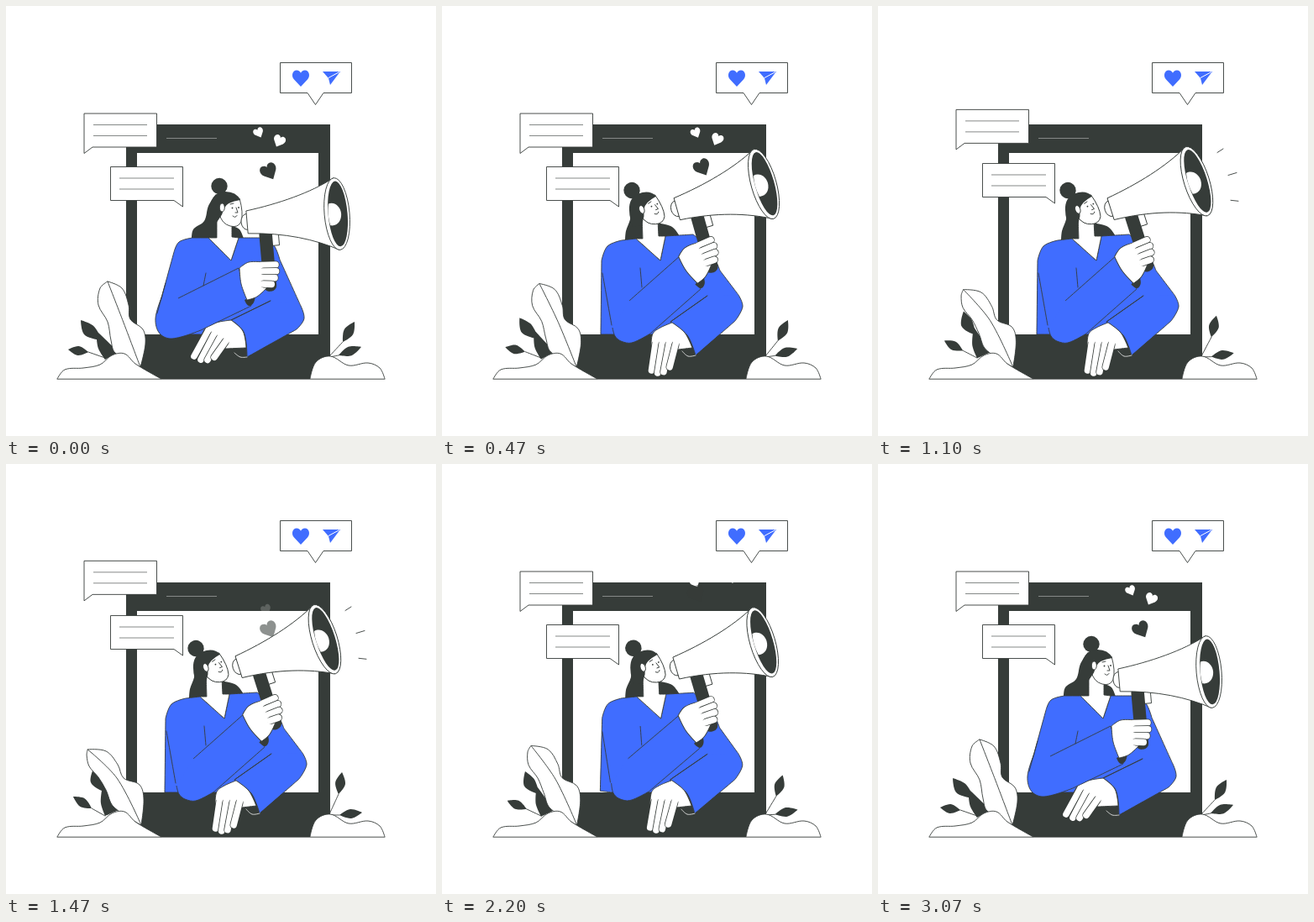
Recreate the animation shown at these times as an HTML page. Size 512 by 512 pixels, loop 3100 ms.

```html
<!DOCTYPE html>
<html lang="en">
<head>
<meta charset="utf-8">
<title>Megaphone announcement</title>
<style>
  html, body { margin: 0; width: 100%; height: 100%; overflow: hidden; background: #fff; }
  svg { display: block; width: 100vw; height: 100vh; }
  .ink { fill: #363c39; }
  .white, .blue { stroke: #363c39; stroke-width: .9; stroke-linejoin: round; }
  .white { fill: #fff; }
  .blue { fill: #406dff; }
  .plain { fill: #fff; }
  .icon { fill: #406dff; }
  .line, .rule, .light, .edge, .finger { fill: none; stroke: #363c39; stroke-width: .9; stroke-linecap: round; }
  .rule { stroke: #858987; stroke-width: 1; stroke-linecap: butt; }
  .light { stroke: #e4e5e4; }
  .edge { stroke-width: 9.2; }
  .finger { stroke: #fff; stroke-width: 7.6; }
</style>
</head>
<body>
<svg viewBox="0 0 512 512">
  <defs>
    <path id="heart" d="M0 10L-8 1.5C-12-3-9.5-9.6-5-9.6C-2.5-9.6-.8-8.2 0-6.2C.8-8.2 2.5-9.6 5-9.6C9.5-9.6 12-3 8 1.5Z"/>
  </defs>

  <g id="plants"></g>
  <path class="ink" fill-rule="evenodd" d="M143 141H386V444H143ZM156 175V391H372V175Z"/>
  <path class="rule" d="M191 157.5H251"/>
  <g id="hearts"></g>

  <g id="bubbleA">
    <path class="white" d="M93 128H179.5V168H103L93 175.5Z"/>
    <path class="rule" d="M104 141.5H168M104 154.5H168"/>
  </g>
  <g id="bubbleB">
    <path class="white" d="M124.5 191.5H210.5V239L200 231.5H124.5Z"/>
    <path class="rule" d="M135 205H200M135 218H200"/>
  </g>
  <path class="white" d="M326.5 67.5H411.5V103.5H378L368.5 117.5L359 103.5H326.5Z"/>
  <use id="like" class="icon" href="#heart"/>
  <g id="send">
    <path class="icon" d="M-11-8H10L-2 8L-4 0Z"/>
    <path d="M-4-.5L9-7.5" fill="none" stroke="#fff"/>
  </g>

  <g id="ground"></g>
  <path class="line" d="M61 444.2H451"/>

  <g id="torso"></g>
  <g id="head">
    <circle class="ink" r="9.7"/>
    <path class="white" d="M24 14.5Q29 32 26 42.5Q22 50 13 47.5Q3 45 0 33L4 22Z"/>
    <path class="ink" d="M-14 41.5Q-13 7 6 6.5Q20 6 25 16.5Q9 19 6 26L3 34L-3 43Z"/>
    <ellipse class="white" cx="3.3" cy="25.5" rx="3" ry="5"/>
    <circle class="ink" cx="15.5" cy="26" r=".9"/>
    <circle class="ink" cx="23" cy="25.5" r=".9"/>
    <path class="line" d="M20 25.5L22 31.5H19M16 35.5Q19 38.5 21 35M13 21.5L17 20.5"/>
  </g>
  <g id="horn">
    <rect class="white" x="28" y="12" width="9" height="19"/>
    <rect class="ink" x="14" y="10" width="15.5" height="75" rx="7"/>
    <ellipse class="white" cx="1" rx="7" ry="9.5"/>
    <path class="white" d="M1-13C40-18 80-28 108-43V43C80 28 45 17 1 14Z"/>
    <ellipse class="white" cx="108.5" rx="15" ry="43"/>
    <ellipse class="ink" cx="109.5" rx="11.5" ry="39"/>
    <path class="plain" d="M99.5-13C108-15 113.5-7 113.5 0C113.5 8 108 15 99.5 13Q96.7 0 99.5-13Z"/>
  </g>
  <g id="arms"></g>
  <g id="fist"></g>
  <path id="sound" class="line" d="M404 174.5L411 170M417 201.5L427 198.5M420 231.3L429 232.3"/>
</svg>

<script>
const LOOP = 3100;
const $ = id => document.getElementById(id);
const mix = (a, b, p) => a + (b - a) * p;
const moving = [];

function add(parent, tag, cls) {
  const el = document.createElementNS('http://www.w3.org/2000/svg', tag);
  el.setAttribute('class', cls);
  $(parent).append(el);
  return el;
}

// "x,y" is a smooth point, "x,y!" a corner, a final "z" closes the curve.
function parse(text) {
  return text.replace(' z', '').split(' ').map(s => {
    const [x, y] = s.replace('!', '').split(',').map(Number);
    return { x, y, corner: s.endsWith('!') };
  });
}

function curve(pts, closed) {
  const n = pts.length, at = i => pts[(i + n) % n];
  const handle = (i, length) => {
    const p = at(i), a = at(i - 1), b = at(i + 1);
    const k = p.corner ? 0 : length / 3 / Math.hypot(b.x - a.x, b.y - a.y);
    return [(b.x - a.x) * k, (b.y - a.y) * k];
  };
  let d = `M${pts[0].x} ${pts[0].y}`;
  for (let i = 0; i < n - !closed; i++) {
    const p = at(i), q = at(i + 1), length = Math.hypot(q.x - p.x, q.y - p.y);
    const [ax, ay] = handle(i, length), [bx, by] = handle(i + 1, length);
    d += `C${p.x + ax} ${p.y + ay} ${q.x - bx} ${q.y - by} ${q.x} ${q.y}`;
  }
  return closed ? d + 'Z' : d;
}

// A curve that blends between two poses along one channel.
function shape(parent, cls, from, to = from, channel) {
  const el = add(parent, 'path', cls), a = parse(from), b = parse(to), closed = from.endsWith('z');
  const update = pose => {
    const p = channel ? pose[channel] : 0;
    const pts = a.map((s, i) => ({ x: mix(s.x, b[i].x, p), y: mix(s.y, b[i].y, p), corner: s.corner }));
    el.setAttribute('d', curve(pts, closed));
  };
  if (channel) moving.push(update); else update();
}

const segment = (a, b) => `${a}! ${b}!`;

// The white core starts earlier than its edge, so the finger opens into the palm.
function finger(parent, a, b, a2 = a, b2 = b, channel) {
  const back = (p, q) => p.map((v, k) => mix(v, q[k], -.15));
  shape(parent, 'edge', segment(a, b), segment(a2, b2), channel);
  shape(parent, 'finger', segment(back(a, b), b), segment(back(a2, b2), b2), channel);
}

function blade([bx, by], [tx, ty], width) {
  const k = width / Math.hypot(tx - bx, ty - by), nx = (by - ty) * k, ny = (tx - bx) * k;
  const mx = (bx + tx) / 2, my = (by + ty) / 2;
  return `${bx},${by}! ${mx + nx},${my + ny} ${tx},${ty}! ${mx - nx},${my - ny} z`;
}

function sprig(root, base, tip, base2, tip2, width) {
  shape('plants', 'ink', blade(base, tip, width), blade(base2, tip2, width), 'sway');
  shape('plants', 'line', segment(base, root), segment(base2, root), 'sway');
}

// Plants and ground
sprig([118, 419], [98, 412], [74, 409], [102, 410], [80, 396], 5.5);
sprig([385, 417], [401, 400], [415, 376], [396, 393], [400, 367], 6);
sprig([385, 418], [396, 416], [423, 406], [397, 418], [424, 415], 5.5);
shape('plants', 'ink',
  '89,374! 103,380 110,389! 134,412! 118,421! 110,408 108,397! 93,391 z',
  '105,361! 113,371 116,382! 134,412! 118,419! 113,404 114,389! 101,379 z', 'sway');
shape('ground', 'white',
  '121,328! 138,336 146,356 148,373 163,385 166,402 160,430! 130,413 125,398 121,376 110,356 112,336 z',
  '97,340! 119,342 133,358 140,374 159,382 164,399 161,430! 128,408 119,388 110,373 99,360 96,347 z', 'sway');
shape('ground', 'line', '121,328! 140,377 160,430!', '97,340! 132,374 161,430!', 'sway');
shape('ground', 'white', '61,444! 70,433 92,431 112,427 126,416 141,414 154,426 185,444!');
shape('ground', 'white', '362,444! 369,424 386,417 408,428 431,425 445,431 451,444!');

// Hair, torso and neck
shape('torso', 'ink',
  '250,224! 241,238 236,256 223,266 221,277! 283,277! 278,266 270,262! 262,240!',
  '236,224! 226,236 224,254 219,268 218,279! 283,274! 274,263 260,259! 250,240!', 'lift');
shape('torso', 'blue',
  '241,276! 222,276! 206,281 200,293! 180,366! 200,391! 300,391! 350,355! 326,302! 319,285 306,276! 277,276! 268,303! z',
  '231,277! 214,279! 197,286 190,303! 189,391! 203,391! 310,391! 353,344! 331,315! 319,290 299,272! 266,274! 260,303! z', 'lift');
shape('torso', 'white',
  '251,248! 251,276! 241,276! 268,303! 277,276! 269,275! 269,258!',
  '238,248! 239,277! 231,277! 260,303! 266,274! 258,274! 257,256!', 'lift');

// Resting arm
shape('arms', 'blue',
  '315,351! 268,374! 283,388 287,418! 346,385! 355,372 350,355!',
  '316,345! 272,376! 292,392 302,416! 349,375! 358,358 353,344!', 'lift');
shape('arms', 'light', '272,413! 279,418 287,418!', '286,411! 293,417 302,416!', 'lift');
shape('arms', 'white',
  '268,374! 250,377 238,383 232,394! 262,408! 286,407! 282,387 z',
  '274,377! 260,383 251,390 249,406! 281,409! 298,407! 289,389 z', 'lift');
for (let i = 0; i < 4; i++) {
  const arch = i * (3 - i);
  finger('arms', [240 + 7 * i, 388 + 4 * i], [224 + 8 * i, 417 + 1.8 * arch + .4 * i],
    [254 + 8 * i, 403], [249.5 + 7.2 * i, 434 + 2.2 * arch - 1.4 * i], 'lift');
}

// Raised arm
shape('arms', 'blue',
  '186,345! 178,372 183,390 198,396 232,386! 292,357! 277,312! 205,348!',
  '203,383! 206,393 213,399 226,401 248,390! 308,337! 284,297! 223,351!', 'arm');
shape('arms', 'line', '190,330! 180,366!', '191,318! 202,380!', 'lift');
shape('arms', 'line', '235,333! 238,318!', '238,335! 236,312!', 'lift');
shape('arms', 'line', '268,374! 315,351!', '272,376! 316,345!', 'lift');
shape('fist', 'ink', '-19,23! -6,17! -8,26 -14,30 z');
shape('fist', 'white', '-25,-15! -14,-22 4,-22! 12,4! -4,19 -16,23! -23,4 z');
for (let i = 0; i < 4; i++) {
  finger('fist', [4, -18.5 + 7.5 * i], [18 + 1.7 * i - 1.1 * i * i, -19 + 7.8 * i]);
}

const ease = (t, a, b) => {
  const u = Math.min(1, Math.max(0, (t - a) / (b - a)));
  return u * u * (3 - 2 * u);
};
const bump = (t, a, b, c, d) => ease(t, a, b) - ease(t, c, d);

function place(id, x, y, turn = 0, size = 1) {
  $(id).setAttribute('transform', `translate(${x} ${y}) rotate(${turn}) scale(${size})`);
}

// Each heart fades in, waits, drifts away and fades out.
function heart(cls, size, turn, [x, y], [x2, y2], born, go, end) {
  const el = add('hearts', 'use', cls);
  el.setAttribute('href', '#heart');
  return t => {
    const s = t + LOOP < end ? t + LOOP : t, u = ease(s, go, end);
    el.setAttribute('transform',
      `translate(${mix(x, x2, u)} ${mix(y, y2, u)}) rotate(${turn}) scale(${size})`);
    el.setAttribute('opacity', bump(s, born, born + 250, end - 350, end));
  };
}

const hearts = [
  heart('plain', .6, -25, [301, 151], [307, 152], 2410, 3370, 4000),
  heart('plain', .6, -25, [310, 174], [298, 127], 1400, 1400, 2650),
  heart('plain', .72, 25, [325, 161], [336, 152], 2330, 3370, 4050),
  heart('plain', .72, 25, [318, 177], [364, 114], 1500, 1500, 2650),
  heart('ink', 1, -28, [313.5, 197.5], [290, 165], 2280, 3370, 4200),
  heart('ink', 1, -28, [313.5, 197.5], [302, 150], 1335, 1620, 2350)
];

function draw(t) {
  const lift = bump(t, 0, 430, 2130, 2570);
  const swing = bump(t, 60, 600, 2130, 2570);
  const dip = bump(t, 2150, 2570, 2600, 3070);
  const sway = (1 - Math.cos(2 * Math.PI * t / LOOP)) / 2;
  const pose = { lift, sway, arm: lift - .25 * dip };

  moving.forEach(update => update(pose));
  hearts.forEach(update => update(t));

  place('head', 254 - 28 * lift - 2 * dip, 214.5 + 5 * lift + dip, -20 * lift - 2 * dip);
  place('horn', 286 - 10 * swing ** 2 + 7 * dip, 257 - 15.5 * lift + 7 * dip, -5 - 12.6 * swing + 7.5 * dip);
  place('fist', 303 + 7.5 * lift - 2.5 * dip, 327 - 24 * lift + 4 * dip, -22 * lift);

  const bob = bump(t, 900, 1400, 1400, 2100);
  place('bubbleA', 0, -13 * bob);
  place('bubbleB', 0, -11.3 * bob);

  const size = 1 + .35 * bump(t, 2530, 2780, 2780, 3030);
  place('like', 351, 86, 0, size);
  place('send', 388, 86, 0, size);
  $('sound').setAttribute('opacity', bump(t, 850, 1000, 2000, 2120));
}

const start = performance.now();
function tick() {
  draw((performance.now() - start) % LOOP);
  requestAnimationFrame(tick);
}
tick();
</script>
</body>
</html>
```
